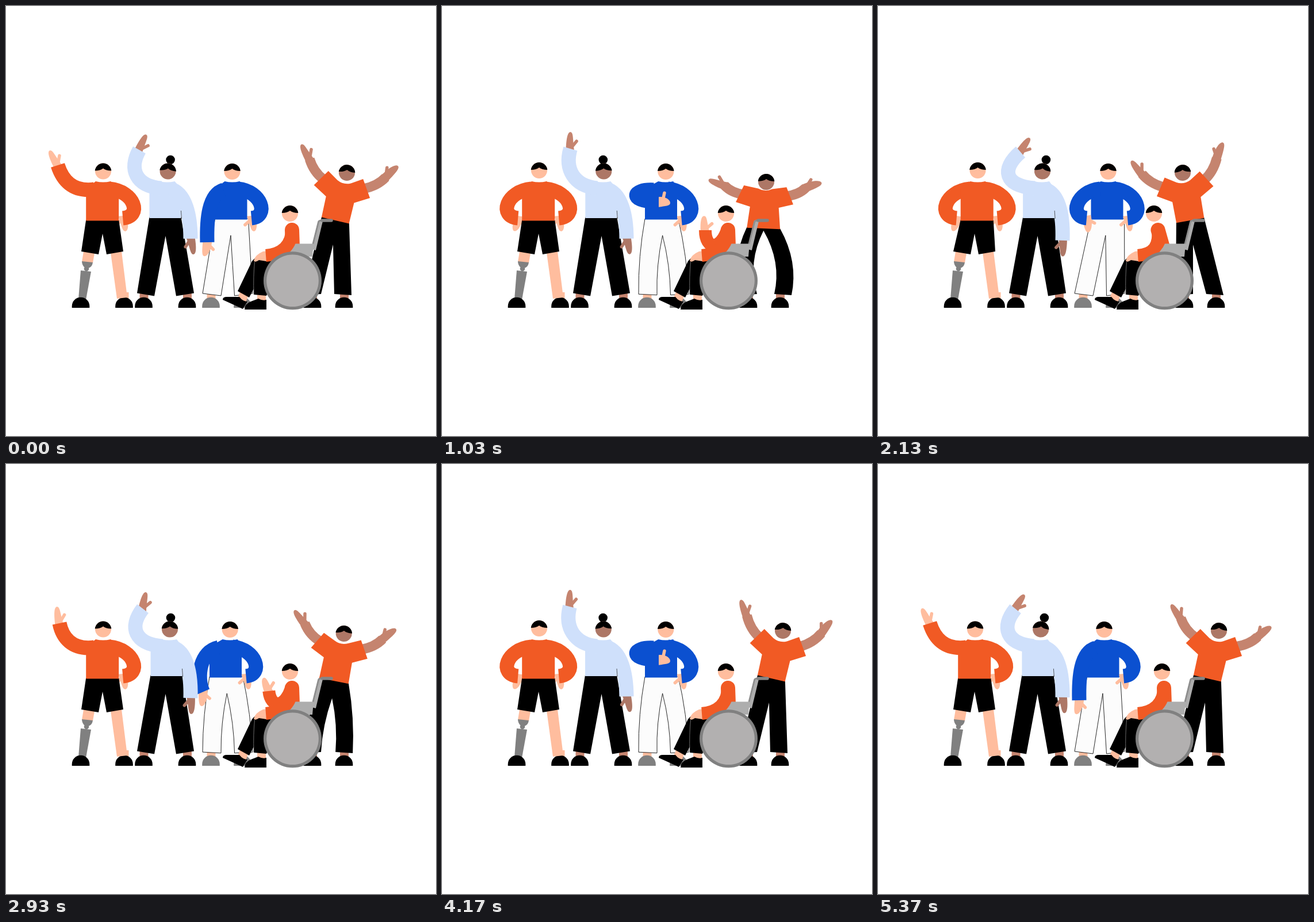
Write an HTML page with a canvas that moves like this. It is 748 px wide and 748 px high and loops after 5410 ms.

```html
<!DOCTYPE html>
<html lang="en">
<head>
<meta charset="utf-8">
<title>Waving group</title>
<style>
html, body { margin: 0; width: 100%; height: 100%; overflow: hidden; background: #fff; }
canvas { display: block; width: 100vw; height: 100vh; }
</style>
</head>
<body>
<canvas id="stage" width="748" height="748"></canvas>
<script>
const ctx = document.getElementById('stage').getContext('2d');
const LOOP = 5410, HALF = LOOP / 2, SWAY = LOOP / 4, WAVE = LOOP / 12;
const SKIN = '#ffbd9e', TAN = '#c5846f', BROWN = '#ad7766', BLACK = '#000';
const ORANGE = '#f15a24', SKY = '#cfe0fb', BLUE = '#0b50d0';
const GREY = '#808080', SILVER = '#b2b0b0';

const clamp = (x, a, b) => Math.max(a, Math.min(b, x));
const lerp = (a, b, u) => a + (b - a) * u;
const mix = (a, b, u) => a.map((v, i) => lerp(v, b[i], u));
const rad = deg => deg * Math.PI / 180;

// Smooth step from 0 to 1 between a and b.
function ease(t, a, b) {
  const u = clamp((t - a) / (b - a), 0, 1);
  return u * u * (3 - 2 * u);
}

// 0, then 1 between b and c, then 0 again.
const hold = (t, a, b, c, d) => ease(t, a, b) - ease(t, c, d);

// Cosine that peaks at the given time.
const swing = (t, peak, period) => Math.cos((t - peak) / period * 2 * Math.PI);

function fill(d, color) {
  ctx.fillStyle = color;
  ctx.fill(new Path2D(d));
}

function line(d, color, width, cap = 'butt') {
  ctx.strokeStyle = color;
  ctx.lineWidth = width;
  ctx.lineCap = cap;
  ctx.lineJoin = 'round';
  ctx.stroke(new Path2D(d));
}

function disc(x, y, r, color) {
  ctx.fillStyle = color;
  ctx.beginPath();
  ctx.arc(x, y, r, 0, 7);
  ctx.fill();
}

function at(x, y, deg, draw) {
  ctx.save();
  ctx.translate(x, y);
  ctx.rotate(rad(deg));
  draw();
  ctx.restore();
}

const arm = (pts, color, width = 25) =>
  line(`M${pts[0]},${pts[1]} C${pts.slice(2).join(' ')}`, color, width);

// Mitten hand; angle 0 points up, thumb is -1..1, reach shortens it to a fist.
function hand(x, y, deg, thumb, color, reach = 1) {
  const curl = 1 - reach, w = 7.5 + curl * 3, len = 29 * reach, tip = -2.5 * thumb * reach;
  at(x, y, deg, () => {
    fill(`M${-w},4 C${-w - 1},${-len * .4} ${tip - 6},${-len} ${tip},${-len} `
      + `C${tip + 6},${-len} ${tip + 5},${-len * .45} ${w},4 Z`, color);
    line(`M${thumb * 2},-3 L${thumb * (9.5 + curl * 14)},${-14 + curl * 18}`, color, 5.5, 'round');
  });
}

function head(x, y, color, tilt = 0) {
  at(x, y, tilt, () => {
    disc(0, 0, 14, color);
    fill('M-14.3,-1 A14.4,14.6 0 0 1 14.3,-1 Q5,-1 0,-5 Q-5,-1 -14.3,-1 Z', BLACK);
  });
}

function shoe(x, color) {
  fill(`M${x - 15.3},525 V522 A15.3,15.3 0 0 1 ${x + 15.3},522 V525 Z`, color);
}

function foot(x, skin, color) {
  ctx.fillStyle = skin;
  ctx.fillRect(x - 7, 498, 15, 14);
  shoe(x, color);
}

function torso(cx, neck, half, bottom, color) {
  fill(`M${neck - 13},305 Q${neck},308 ${neck + 13},305 L${cx + half},318 V${bottom} H${cx - half} V318 Z`, color);
}

// Trousers from waist corners a, b and crotch c down to two hems.
function pants(a, b, c, left, right, tilt, bow, color) {
  const up = 502 - tilt, low = 502 + tilt;
  const q = (x0, y0, x1, y1, s) => `Q${(x0 + x1) / 2 + s},${(y0 + y1) / 2} ${x1},${y1} `;
  const d = `M${a} ` + q(...a, left[0], up, -bow) + `L${left[1]},${low} `
    + q(left[1], low, ...c, -bow) + q(...c, right[0], low, bow)
    + `L${right[1]},${up} ` + q(right[1], up, ...b, bow) + 'Z';
  fill(d, color);
  return d;
}

const hipArm = (cx, side, width) => [cx + side * 12, 318, cx + side * (width - 11), 322,
  cx + side * (width + 3), 366, cx + side * 35.5, 369];

function hipSide(cx, width, color) {
  const pts = hipArm(cx, 1, width);
  hand(pts[6], pts[7], 174, 1, SKIN, .8);
  arm(pts, color);
}

// Figure with the prosthetic leg: one arm swings between a wave and the hip.
function first(t) {
  const up = 1 - hold(t, 690, 985, 2200, 2445);
  const hx = 169 + 4.5 * hold(t, 1600, 2000, 2180, 2480), cx = hx - 1.3, dx = cx - 167.5;
  const wag = (1 - swing(t, 0, LOOP / 8)) / 2, out = Math.sin(Math.PI * up);
  const raised = [cx - 14, 319, 115, 324, 98, 302, 90 + wag * 4, 277];
  const pts = mix(hipArm(cx, -1, 67), raised, up);
  pts[6] -= 30 * out;
  const deg = lerp(-170, -24 + 27 * wag, up);

  foot(205.5, SKIN, BLACK);
  fill('M182,429 L201,427 L211,507 L193,509 Z', SKIN);
  fill('M135,427 L154,430 L151,447 L132,445 Z', SKIN);
  fill('M132,444 L151,446 Q150,454 143,456 L137,455 Q132,451 132,444 Z', GREY);
  disc(140, 457, 4.3, GREY);
  fill('M130,460 L148,462 L139,511 L126,510 Z', GREY);
  shoe(130, BLACK);

  hand(pts[6], pts[7], deg, clamp(Math.cos(rad(deg)) * 3, -1, 1), SKIN, lerp(.8, 1, up));
  arm(pts, ORANGE);
  hipSide(cx, 67, ORANGE);
  fill(`M${139 + dx},372 H${196 + dx} L204,427 L175,432 L168,396 L161,432 L131,427 Z`, BLACK);
  torso(cx, hx, 28.5, 373.5, ORANGE);
  head(hx, 286 + 1.5 * up, SKIN);
}

// Figure with the bun: body, wrist and hand follow one wave, each a little later.
function second(t) {
  const body = swing(t, 295, WAVE), wrist = swing(t, 322, WAVE), late = swing(t, 367, WAVE);
  const hx = 283.3 + 3 * body, cx = 278 + 1.8 * body;
  const wx = 235 + 13 * wrist, wy = 251 + 3 * wrist, ty = 406 + 2 * body;
  foot(239.5, TAN, BLACK);
  foot(315, TAN, BLACK);
  pants([cx - 27.5, 367], [cx + 27.5, 367], [277.5, 400], [228, 258], [296, 327], 2.5, 0, BLACK);
  hand(321, ty, 178 + 7 * body, 1, BROWN, .95);
  torso(cx, hx - 1, 27.5, 369, SKY);
  arm([cx + 8, 318, cx + 36, 325, 321.5 + body, 365, 321, ty], SKY);
  line(`M${cx + 27.5},356 L${cx + 28.5},370`, '#333', .8);
  hand(wx, wy, 23 + 18 * late, 1, TAN);
  arm([cx - 7, 317, 225 - 5 * wrist, 313, 213, 284, wx, wy], SKY);
  disc(hx + 3 + 4 * late, 267.5, 7.8, BLACK);
  head(hx, 287.5, BROWN, 3 + 4 * late);
}

// Figure in blue: the arm hangs, rests on the hip or gives a thumbs up.
const hang = [-13, 320, -39.5, 328, -42.5, 372, -41.5, 411, 186, .85];
const hip = [...hipArm(0, -1, 64.5), 168, .85];
const praise = [-13, 320, -51, 318, -59, 341, 0, 341, 90, .55];

function third(t) {
  const cx = 391.5 - 10.5 * ease(t, 0, 280) + 17.5 * ease(t, 1620, 1950) - 7 * ease(t, 2230, 2640);
  const left = Math.max(0, 391.5 - cx), hx = cx + 2 + left * .6, bow = left * .6;
  const rest = mix(hang, hip, hold(t, 60, 480, 2230, 2560));
  const pose = mix(rest, praise, hold(t, 740, 980, 1540, 1850));
  const pts = pose.slice(0, 8).map((v, i) => i % 2 ? v : v + cx), [deg, reach] = pose.slice(8);

  foot(356.5, SKIN, GREY);
  foot(411.5, SKIN, GREY);
  const legs = pants([cx - 28, 370], [cx + 30, 370], [lerp(383, cx, .7) + 2, 399],
    [342, 374], [397.5, 429], 2 - bow * .2, bow, '#fcfcfc');
  line(legs, '#111', .9);
  hipSide(cx, 64, BLUE);
  torso(cx, hx, 28, 371.5, BLUE);
  const layers = [() => hand(pts[6], pts[7], deg, -1, SKIN, reach), () => arm(pts, BLUE)];
  if (deg < 135) layers.reverse();
  layers.forEach(draw => draw());
  head(hx, 288, SKIN);
}

// Seated figure: one arm stays on the lap, the other rises to greet.
const lap = [497, 418, 479, 432, 452, 434], greet = [485, 425, 458, 425, 458, 390];

function fourth(t) {
  const lean = hold(t, 1700, 2020, 2240, 2520), up = hold(t, 20, 280, 1120, 1390);
  const sx = 497.5 - 10.5 * lean, wave = mix(lap, greet, up);
  fill('M407,497 L422,503 L417,515 L403,510 Z', SKIN);
  fill('M437,498 H452 V513 H437 Z', SKIN);
  fill('M377,511 Q377,506 384,506 L406,506 Q412,514 420,514 L412,527 Z', BLACK);
  fill('M415,528 Q415,518 426,514 L439,509 Q446,513 453,511 V528 Z', BLACK);
  fill('M460,438 L440,436 Q430,438 426,448 L403,496 L423,507 L431,492 V502 L453,504 L470,460 Z', BLACK);
  line('M432.5,445 Q430,470 431,502', '#777', .9);

  line(`M${sx},389.5 L499,432`, ORANGE, 25, 'round');
  line('M535,424 L547,374', '#adadad', 8);
  line('M534,414 L543.5,376 Q544.5,373 549,373', '#8e8e8e', 3);
  line('M550,373 H566', '#858585', 5.5, 'round');
  fill('M499,413.5 H535 L533,436 H478 Q494,426 499,413.5 Z', '#adadad');
  if (up > 0) {
    hand(wave[4], wave[5], lerp(-150, 0, up), 1, SKIN, .85);
    arm([sx - 1, 388, ...wave], ORANGE, 22);
  }
  fill('M455,426 L447,427 Q433,433 431,443 Q433,447 440,442 L453,444 Z', SKIN);
  arm([sx, 388, lap[0] - 7 * lean, ...lap.slice(1)], ORANGE, 22);
  head(494 - 14 * lean, 361, SKIN);
  disc(498.5, 477.8, 50.5, GREY);
  disc(498.5, 477.8, 45.3, SILVER);
}

// Swaying figure: dips between the two sides while the arms drop and lift late.
function fifth(t) {
  const sway = 1 - 2 * hold(t % SWAY, 160, 530, 836, 1206);
  const low = 1 - sway * sway, dip = 14 * low;
  const fall = hold((t + SWAY / 2 - 150) % (SWAY / 2), 0, 180, 250, 640);
  const x = 558 + 15 * sway, y = 372 + dip, tilt = 1.5 + 11.5 * sway, a = rad(tilt);
  const half = 24.5 + dip * .32, drop = dip * .55;
  const turn = (px, py) => [x + px * Math.cos(a) - py * Math.sin(a), y + px * Math.sin(a) + py * Math.cos(a)];

  foot(533, TAN, BLACK);
  foot(588, TAN, BLACK);
  pants(turn(-half, 0), turn(half, 0), [lerp(x, 559.5, .3), 415 - dip * 1.75],
    [518, 548], [571 + dip * .5, 601 + dip * .5], -1, dip * 1.6, BLACK);
  for (const side of [-1, 1]) {
    const [sx, sy] = turn(side * 36, drop - 64);
    const lift = rad(44 + 14 * sway * side + 22 * fall), len = 44 - 6 * fall;
    const wx = sx + side * len * Math.sin(lift), wy = sy - len * Math.cos(lift);
    line(`M${sx},${sy} Q${(sx + wx) / 2 + side * 5},${(sy + wy) / 2 + 5} ${wx},${wy}`, TAN, 17);
    hand(wx, wy, side * (25 + 9 * sway * side + 41 * fall), -side, TAN);
  }
  at(x, y, tilt, () => {
    const top = 31 + drop * .8, ty = -80 + drop, oy = -50.5 + drop;
    fill(`M-12,-68 L${-top},${ty} L-50,${oy} L-25,-36 L${-half},1 H${half} L25,-36 L50,${oy} L${top},${ty} L12,-68 Q0,-62 -12,-68 Z`, ORANGE);
  });
  head(561.5 + 31.5 * sway, 290 + 16 * low, BROWN, tilt * .3);
}

function frame(now) {
  const t = now % HALF;
  ctx.fillStyle = '#fff';
  ctx.fillRect(0, 0, 748, 748);
  for (const draw of [first, third, second, fifth, fourth]) draw(t);
}

const start = performance.now();
function tick() {
  frame(performance.now() - start);
  requestAnimationFrame(tick);
}
tick();
</script>
</body>
</html>
```
